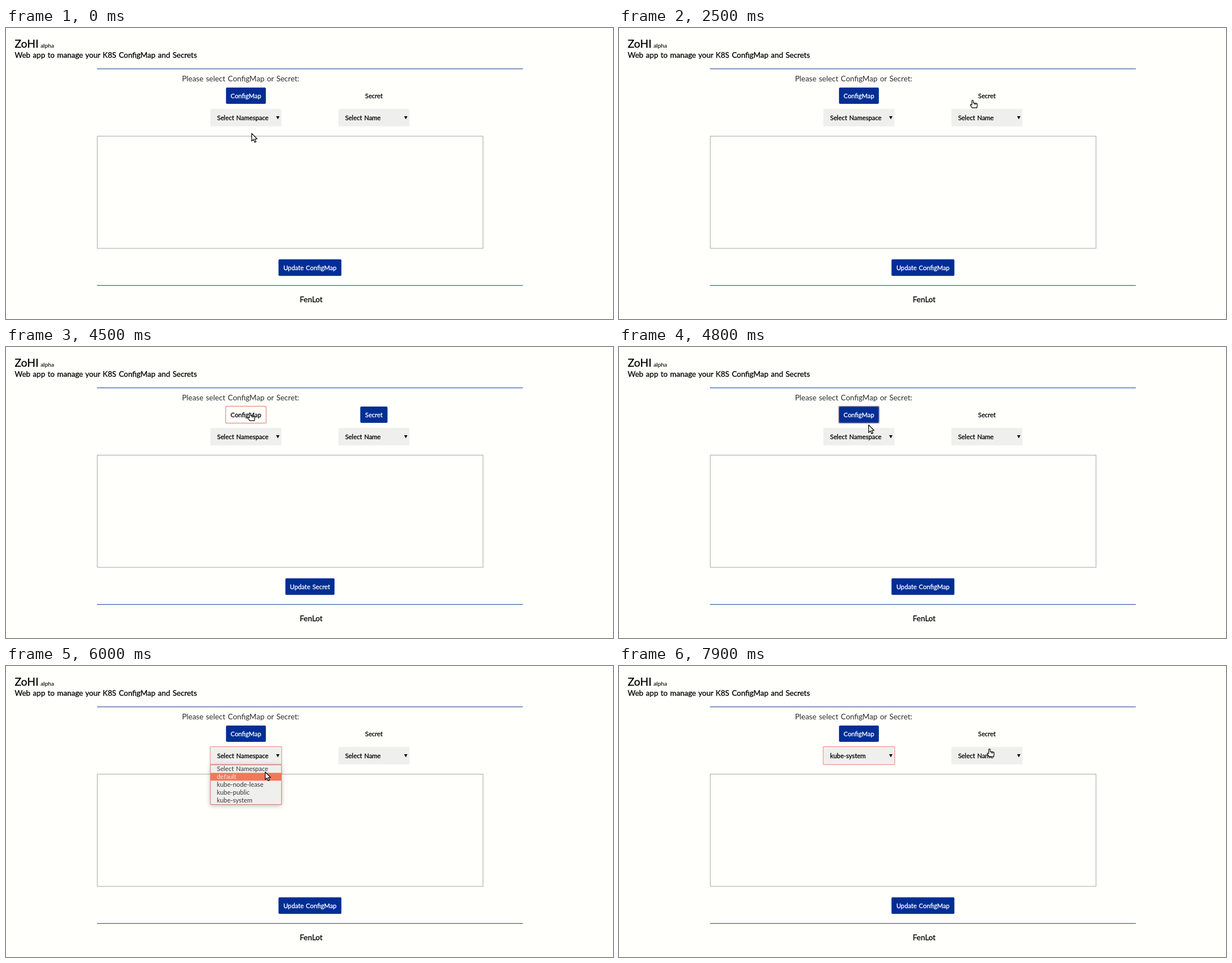
An HTML page for the animation above (8 s loop, 1081 by 518 pixels).

```html
<!DOCTYPE html>
<html lang="en">
<head>
<meta charset="utf-8">
<title>ZoHI</title>
<style>
  html, body { margin: 0; width: 100%; height: 100%; overflow: hidden; background: #fffffc; }
  svg { display: block; width: 1081px; height: 518px; }
  text { font: 11.3px Lato, "Open Sans", sans-serif; word-spacing: 1px; }
  .bold { stroke-width: .3px; }
  .big { font-size: 19.5px; }
  .small { font-size: 10.3px; stroke-width: .1px; }
  .line { font-size: 13.5px; }
  .popup { filter: drop-shadow(0 2px 4px rgba(0, 0, 0, .28)); }
</style>
</head>
<body>
<svg id="stage" viewBox="0 0 1081 518"></svg>
<script>
const LOOP = 8000, STEP = 100;
const BLUE = '#002e94', GREY = '#eff0ed', CORAL = '#f5765a', RULE = '#4566a3';
const OPTIONS = ['Select Namespace', 'default', 'kube-node-lease', 'kube-public', 'kube-system'];
const LEFT = 427.3, RIGHT = 655.2, MIDDLE = 541.3, ROW = 13.9;

// Pointer moves: start, end, x, y
const START = [437, 187];
const MOVES = [
  [900, 1400, 424, 160], [1700, 2000, 569, 142], [2100, 2500, 630, 128],
  [2500, 2800, 635, 120], [3400, 3700, 571, 127], [3900, 4400, 435, 117],
  [4600, 4800, 444, 138], [4800, 4900, 463, 155], [5500, 6000, 461, 188],
  [6900, 7000, 461, 235], [7600, 7900, 660, 147]
];

const centred = (cx, y, w, h) => [cx - w / 2, y, w, h];
const CONFIG = centred(LEFT, 106, 71, 29), SECRET = centred(RIGHT, 106, 48.5, 29);
const SPACE = centred(LEFT, 144, 126.5, 31), NAME = centred(RIGHT, 144, 126.5, 31);

const rect = ([x, y, w, h], attrs) =>
  `<rect x="${x}" y="${y}" width="${w}" height="${h}" ${attrs}/>`;

const text = (x, y, str, attrs = '') => `<text x="${x}" y="${y}" ${attrs}>${str}</text>`;

const bold = (x, y, str, size = '', color = '#000', anchor = 'start') =>
  text(x, y, str, `class="bold ${size}" fill="${color}" stroke="${color}" text-anchor="${anchor}"`);

const rule = y => rect([162, y, 758.5, 1.3], `fill="${RULE}"`);

const outline = ([x, y, w, h], color) =>
  rect([x - .5, y - .5, w + 1, h + 1], `rx="1.5" fill="none" stroke="${color}" stroke-width="1.4"`);

function button(box, label, active, focused) {
  const [x, y, w] = box;
  return (active ? rect(box, `rx="2" fill="${BLUE}"`) : '') +
    (focused ? outline(box, active ? '#a98fa0' : '#e79a8a') : '') +
    bold(x + w / 2, y + 19, label, '', active ? '#fff' : '#000', 'middle');
}

function select(box, label, focused) {
  const [x, y, w] = box;
  return rect(box, `fill="${GREY}"`) + (focused ? outline(box, '#eda393') : '') +
    bold(x + 12, y + 20, label) +
    `<path d="M${x + w - 9.5} ${y + 13}h6l-3 5.5z"/>`;
}

function popup(chosen) {
  const [x, , w] = SPACE, top = 176;
  const box = [x, top, w, ROW * OPTIONS.length + 1];
  return rect(box, `class="popup" fill="${GREY}"`) +
    rect([x, top + chosen * ROW + .3, w, ROW], `fill="${CORAL}"`) +
    rect(box, 'fill="none" stroke="#cf7f70"') +
    OPTIONS.map((name, i) => text(x + 11.5, top + i * ROW + 11.3, name,
      `fill="${i === chosen ? '#ffe9e2' : '#333'}"`)).join('');
}

function pointer(t) {
  let [px, py] = START;
  for (const [from, to, x, y] of MOVES) {
    const k = Math.min(1, Math.max(0, (t - from) / (to - from)));
    px += (x - px) * k;
    py += (y - py) * k;
  }
  return [px, py];
}

function cursor(t, open) {
  const [px, py] = pointer(t);
  const over = ([x, y, w, h]) =>
    px > x - 2 && px < x + w + 2 && py > y - 2 && py < y + h + 2;
  const hand = !open && [CONFIG, SECRET, SPACE, NAME].some(over);
  const shape = hand
    ? 'M-1.5 9V1.3q1.2-1.6 2.5 0V5.4l5.6 .7q1.7 .4 1.5 2.3l-.7 5.7H-1l-3.2-4.6q-.3-2 1.6-1zM3.2 6v2.4M5.5 6.4v2.3'
    : 'M.6 .7v13.6l3.2-2.9 2.2 5 2.3-1-2.2-4.9h4.2z';
  return `<path d="${shape}" transform="translate(${px} ${py})" fill="#fff"
    stroke="#000" stroke-width="1.2" stroke-linejoin="round"/>`;
}

function scene(t) {
  const secret = t >= 3100 && t < 4600;
  const open = t >= 5300 && t < 7600;
  const chosen = t < 6000 ? 0 : t < 6800 ? 1 : t < 7000 ? 2 : 4;
  const kind = secret ? 'Secret' : 'ConfigMap';
  return bold(15.5, 35, 'ZoHI', 'big') +
    bold(61.5, 35, 'alpha', 'small') +
    bold(15.5, 53, 'Web app to manage your K8S ConfigMap and Secrets', 'line') +
    rule(72) +
    text(313.5, 95, 'Please select ConfigMap or Secret:', 'class="line" fill="#2b2b2b"') +
    button(CONFIG, 'ConfigMap', !secret, t >= 4500 && t < 5300) +
    button(SECRET, 'Secret', secret, t >= 3100 && t < 4500) +
    select(SPACE, t < 7600 ? OPTIONS[0] : OPTIONS[4], t >= 5300) +
    select(NAME, 'Select Name') +
    rect([162.5, 192.5, 687, 199.7], 'fill="none" stroke="#a5a8a4"') +
    button(centred(MIDDLE, 411.8, secret ? 87.5 : 112, 29.4), 'Update ' + kind, true) +
    rule(457.7) +
    bold(543.5, 488, 'FenLot', 'line', '#000', 'middle') +
    (open ? popup(chosen) : '') + cursor(t, open);
}

const stage = document.getElementById('stage');
const start = performance.now();
let shown = -1;

function tick(now) {
  const t = Math.floor(Math.max(0, now - start) % LOOP / STEP) * STEP;
  if (t !== shown) stage.innerHTML = scene(shown = t);
  requestAnimationFrame(tick);
}
tick(start);
</script>
</body>
</html>
```
